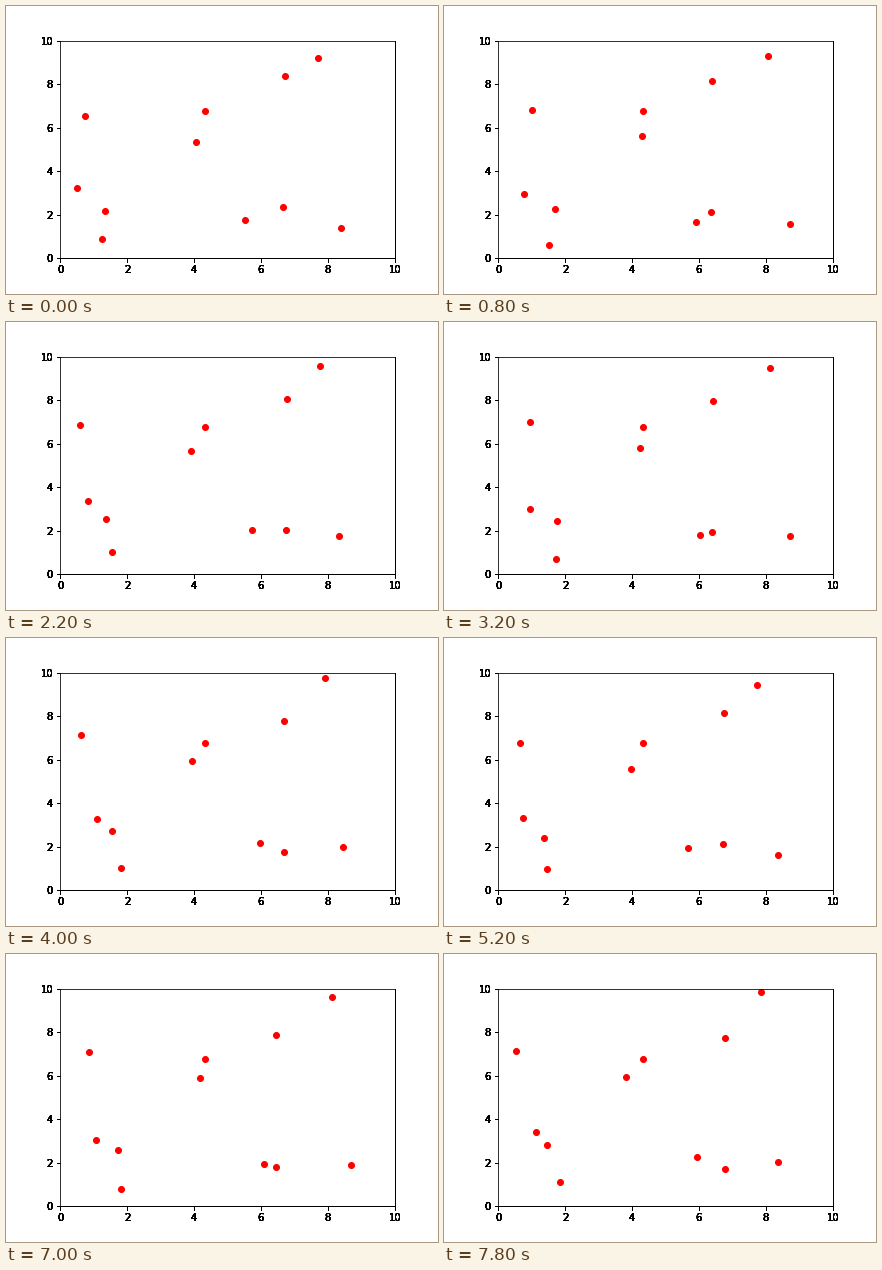
Animation, 432 px wide and 288 px high, one loop 8 s. Source, as a matplotlib script:

```python
import numpy as np
import matplotlib.pyplot as plt
from matplotlib.animation import FuncAnimation

W, H, DPI = 432, 288, 72
FRAMES, STEP = 40, 200
BOX = [0.125, 0.125, 0.775, 0.755]

# Start x, start y and heading in degrees of each moving dot.
DOTS = np.array([
    (0.75, 6.53, 47), (0.51, 3.22, -48), (1.34, 2.16, 15), (1.25, 0.87, -41),
    (4.06, 5.33, 48), (6.72, 8.37, 213), (7.71, 9.20, 15), (5.53, 1.75, -13),
    (6.66, 2.35, 218), (8.39, 1.38, 29),
])
STILL = 4.33 + 6.76j

# Shared looping path: frame, distance and bearing from the start,
# and how far the path has turned since the previous key.
KEYS = np.array([
    (0, 0, 0, 0), (4, 0.38, 0, 65), (11, 0.35, 68, 190), (20, 0.60, 54, 270),
    (26, 0.25, 66, 180), (35, 0.58, 31, 225), (39, 0.65, 63, 95),
])


def polar(r, deg):
    return r * np.exp(1j * np.radians(deg))


start = DOTS[:, 0] + 1j * DOTS[:, 1]
heading = polar(1, DOTS[:, 2])
knots = polar(KEYS[:, 1], KEYS[:, 2])


def path(n):
    """Follow a circular arc between the two nearest keys."""
    k = max(np.searchsorted(KEYS[:, 0], n), 1)
    first, last = KEYS[k - 1:k + 1, 0]
    t, turn = (n - first) / (last - first), KEYS[k, 3]
    arc = (polar(1, turn * t) - 1) / (polar(1, turn) - 1)
    return knots[k - 1] + (knots[k] - knots[k - 1]) * arc


plt.rcParams["font.family"] = "DejaVu Sans"
fig = plt.figure(figsize=(W / DPI, H / DPI), dpi=DPI, facecolor="white")


def add_axes(**kw):
    return fig.add_axes(BOX, xlim=(0, 10), ylim=(0, 10), **kw)


ax = add_axes()
# Repeated ticks and labels give the hard, heavy lettering.
for i in range(10):
    over = add_axes(label=f"ticks{i}", facecolor="none")
    over.spines[["left", "top"]].set_visible(False)

dots, = ax.plot([], [], "ro")


def draw(n):
    z = np.append(start + heading * path(n), STILL)
    dots.set_data(z.real, z.imag)
    return dots,


anim = FuncAnimation(fig, draw, frames=FRAMES, interval=STEP,
                     init_func=lambda: draw(0), repeat=True, repeat_delay=0)
plt.show()
```
